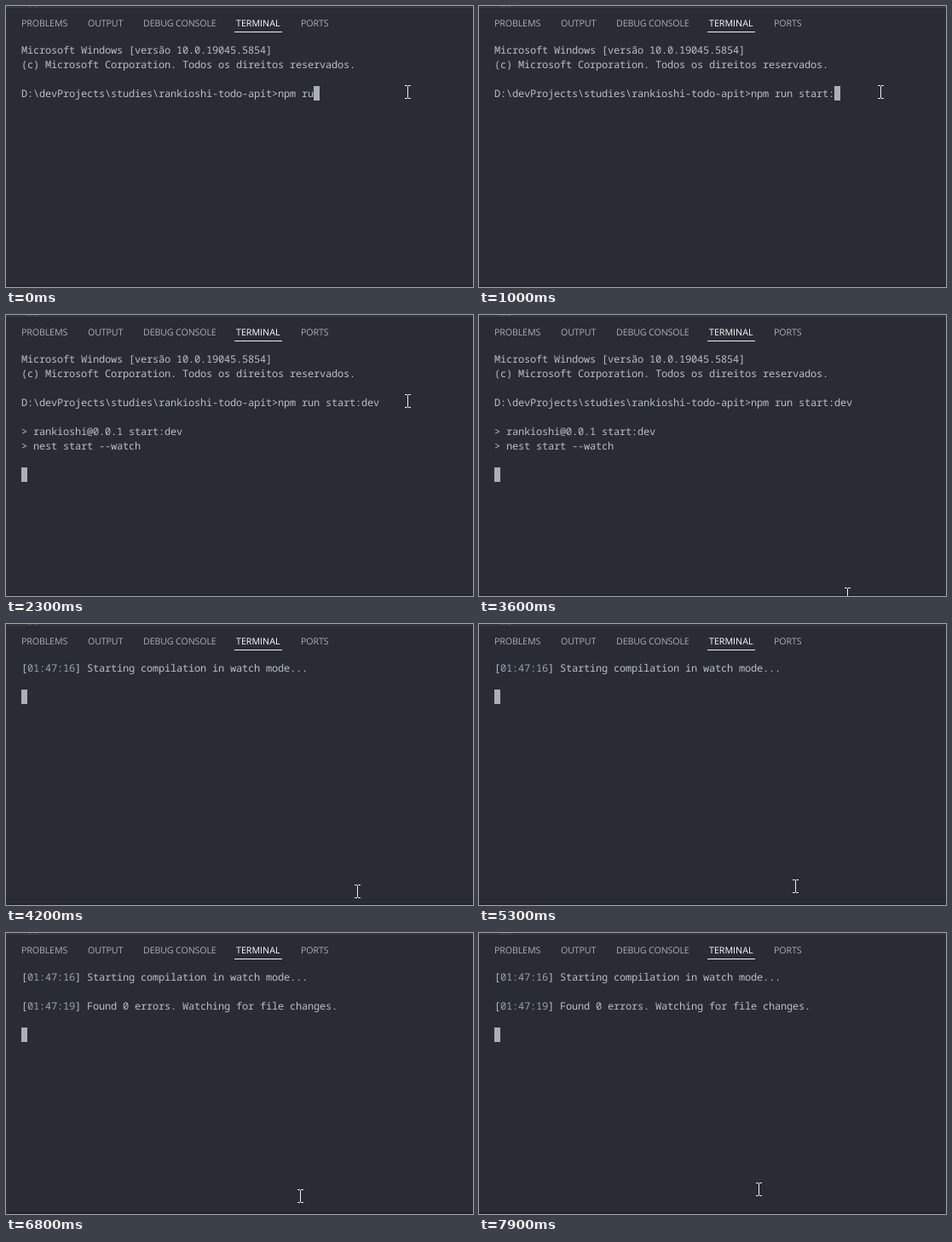
Animation, 548 px wide and 330 px high, one loop 8 s. Source, as an HTML page:

```html
<!DOCTYPE html>
<html lang="en">
<head>
<meta charset="utf-8">
<title>Terminal</title>
<style>
  html, body { margin: 0; width: 100%; height: 100%; overflow: hidden; background: #292c34; }
  svg { display: block; width: 548px; height: 330px; }
  text { white-space: pre; text-rendering: geometricPrecision; }
  .tab { font: 10.7px "Open Sans", "Noto Sans", sans-serif; letter-spacing: -0.15px; fill: #a9adb5; }
  .tab.on { fill: #fff; letter-spacing: 0; }
  .line { font: 500 12px "Noto Sans Mono", "DejaVu Sans Mono", monospace; letter-spacing: -0.2px; fill: #b8bec9; }
  .time { fill: #98a3b1; }
</style>
</head>
<body>
<svg viewBox="0 0 548 330">
  <rect width="548" height="330" fill="#292c34"/>
  <rect y="1" width="548" height="1" fill="#3b3e47"/>
  <path d="M25 .5H39" stroke="#41454e" stroke-dasharray="5 3"/>
  <rect y="328" width="548" height="2" fill="#22252c"/>
  <g id="tabs"></g>
  <rect x="268" y="30" width="56" height="1" fill="#f0f1f3"/>
  <g id="screen"></g>
  <rect id="caret" width="7" height="17" fill="#abafba"/>
  <path id="mouse" fill="none" stroke="#f0f0f2"
    d="M-3 -7.5H0M1 -7.5H4M.5 -7V7M-3 7.5H0M1 7.5H4"/>
</svg>
<script>
const LOOP = 8000, STEP = 100;
const LEFT = 18, TOP = 43, CELL = 7, ROW = 17;
const $ = id => document.getElementById(id);

function add(parent, tag, attrs, content = "") {
  const el = document.createElementNS("http://www.w3.org/2000/svg", tag);
  for (const key in attrs) el.setAttribute(key, attrs[key]);
  el.textContent = content;
  return parent.appendChild(el);
}

[["PROBLEMS", 18], ["OUTPUT", 96], ["DEBUG CONSOLE", 161], ["TERMINAL", 270], ["PORTS", 346]]
  .forEach(([name, x]) =>
    add($("tabs"), "text", { x, y: 24, class: name === "TERMINAL" ? "tab on" : "tab" }, name));

const intro = [
  "Microsoft Windows [versão 10.0.19045.5854]",
  "(c) Microsoft Corporation. Todos os direitos reservados.",
  ""
];
const prompt = "D:\\devProjects\\studies\\rankioshi-todo-apit>";
const command = "npm run start:dev";
const script = ["", "> rankioshi@0.0.1 start:dev", "> nest start --watch", "", ""];
const started = ["[01:47:16] Starting compilation in watch mode...", "", ""];
const found = ["[01:47:19] Found 0 errors. Watching for file changes.", "", ""];

// Number of keys landed in a burst of one key per step
const burst = (t, from, count) =>
  Math.max(0, Math.min(count, Math.floor((t - from) / STEP) + 1));

function linesAt(t) {
  if (t >= 6800) return [...started.slice(0, 2), ...found];
  if (t >= 3800) return started;
  const typed = command.slice(0, 6 + burst(t, 100, 7) + burst(t, 1000, 4));
  const lines = [...intro, prompt + typed];
  if (t >= 2300) lines.push(...script);
  else if (t >= 2000) lines.push("");
  return lines;
}

// Pointer turning points: time, x, y
const path = [
  [2300, 471, 101], [3100, 471, 135], [3300, 485, 235], [3700, 414, 359],
  [4100, 414, 359], [4200, 412, 314], [4900, 405, 313], [5300, 371, 308],
  [5500, 358, 312], [6200, 345, 309], [7400, 345, 309], [7900, 328, 301]
];

function pointerAt(t) {
  const next = path.findIndex(p => p[0] > t);
  const to = path.at(next), from = path[next - 1] || to;
  const k = to === from ? 0 : (t - from[0]) / (to[0] - from[0]);
  return [1, 2].map(i => Math.round(from[i] + (to[i] - from[i]) * k));
}

function drawLine(content, row) {
  const el = add($("screen"), "text", { x: LEFT, y: TOP + 12.5 + row * ROW, class: "line" });
  const stamp = content.match(/^\[(\d\d:\d\d:\d\d)\](.*)/);
  if (!stamp) { el.textContent = content; return; }
  add(el, "tspan", {}, "[");
  add(el, "tspan", { class: "time" }, stamp[1]);
  add(el, "tspan", {}, "]" + stamp[2]);
}

let shown = null;
function render(t) {
  const lines = linesAt(t), text = lines.join("\n");
  if (text !== shown) {
    shown = text;
    $("screen").replaceChildren();
    lines.forEach(drawLine);
    const last = lines.length - 1;
    $("caret").setAttribute("x", LEFT + lines[last].length * CELL);
    $("caret").setAttribute("y", TOP + last * ROW);
  }
  $("mouse").setAttribute("transform", `translate(${pointerAt(t)})`);
}

const start = performance.now();
function tick() {
  const t = (performance.now() - start) % LOOP;
  render(Math.floor(t / STEP) * STEP);
  requestAnimationFrame(tick);
}
tick();
</script>
</body>
</html>
```
